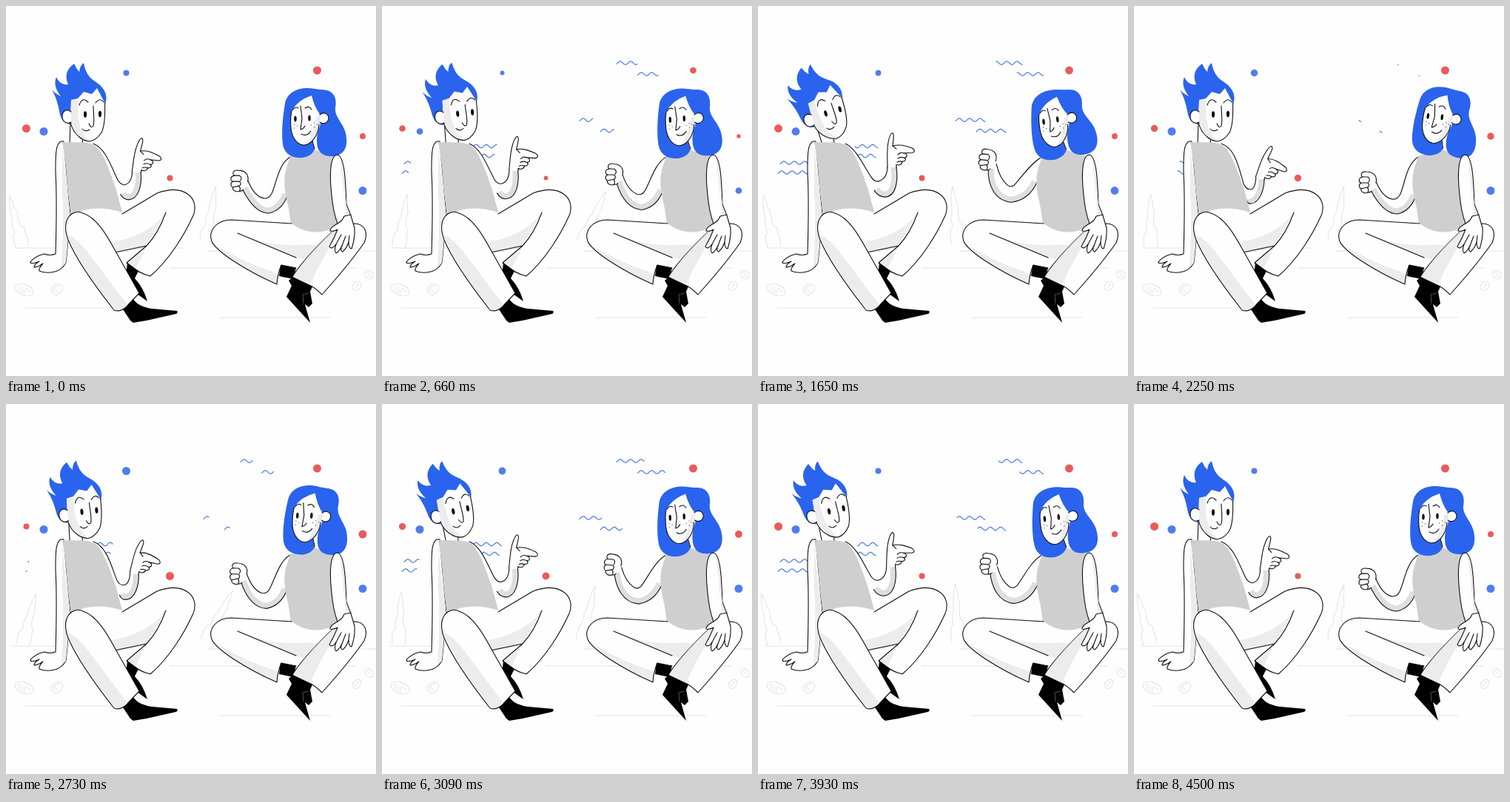
These frames come from a looping animation (500x500 px, 4530 ms). An HTML page:

```html
<!DOCTYPE html>
<html>
<head>
<meta charset="utf-8">
<style>
html, body { margin: 0; width: 100%; height: 100%; overflow: hidden; background: #fefefe; }
svg { display: block; width: 100vw; height: 100vh; }
.ink { stroke: #111; stroke-width: 1.1; stroke-linecap: round; stroke-linejoin: round; }
.w { fill: #fefefe; }
.n { fill: none; }
.g { fill: #cfcfcf; }
.s { fill: #ececec; }
.shade { fill: none; stroke: #dedede; stroke-width: 15; }
.hair { fill: #2a63ee; }
.pale { fill: none; stroke: #e3e3e3; stroke-width: 1; stroke-linejoin: round; }
.wave { fill: none; stroke: #4a7bea; stroke-width: 1.2; stroke-linecap: round; stroke-linejoin: round; }
</style>
</head>
<body>
<svg viewBox="0 0 500 500">
  <clipPath id="mClip"><path id="mClipPath"/></clipPath>
  <clipPath id="fClip"><path id="fClipPath"/></clipPath>
  <g class="pale">
    <path d="M10 327H238M221 354H474M272 331H500M26 408H165M288 421H438"/>
    <ellipse cx="24.5" cy="383.5" rx="13" ry="7.5" transform="rotate(20 24.5 383.5)"/>
    <path d="M17 378Q17 385 26 390M21 380L25 387L27 381L31 386L33 383"/>
    <ellipse cx="69" cy="383" rx="8.5" ry="6.5" transform="rotate(-45 69 383)"/>
    <path d="M64 388Q64 379 73 377M66 383L70 386"/>
    <ellipse cx="474" cy="378.5" rx="7" ry="5" transform="rotate(-45 474 378.5)"/>
    <ellipse cx="490.5" cy="363" rx="6.5" ry="5" transform="rotate(45 490.5 363)"/>
    <path d="M471 382L477 375M488 360L493 366"/>
    <path id="plantL"/>
    <path id="plantR"/>
  </g>
  <g id="waves"></g>
  <g id="dots"></g>

  <!-- man -->
  <path id="mNeck" class="ink w"/>
  <g id="mHead">
    <path class="hair" d="M134 133C138 122 134 113 126 106C117 99 109 97 105 77Q100 80 99 89Q95 85 92 78C82 85 79 94 84 106C77 107 71 103 68 96C64 105 68 114 74 122Q67 119 62 113C69 126 71 136 73 147Q76 158 86 160L100 150Z"/>
    <path class="w" d="M88 127L97 125L105 116L116 119L123 111L133.500 131C134 145 133 163 129 171Q122 182 112 183Q103 181 99 177Q90 170 87 157Z"/>
    <path class="s" d="M88 127L97 125Q96 150 101 165Q106 178 114 182Q103 183 99 177Q90 170 87 157Z"/>
    <path class="ink n" d="M133.500 131C134 145 133 163 129 171Q122 182 112 183Q103 181 99 177Q90 170 87 157"/>
    <path class="ink w" d="M88 143C82 138 76 142 76 149C76 157 83 160 88 157"/>
    <path class="ink n" d="M99 134Q103 122 111 130M121 131Q127 123 132 130M118 135C118 146 120 154 118 162Q115 166 112 159M103 166Q107 171 113 167"/>
    <ellipse cx="107" cy="146.5" rx="2" ry="4.2"/>
    <ellipse cx="127" cy="146" rx="2" ry="4.2"/>
  </g>
  <path id="mArm" class="w"/>
  <path id="mArmShade" class="shade" clip-path="url(#mClip)"/>
  <path id="mArmLine" class="ink n"/>
  <g id="mHand">
    <path class="ink w" d="M-5 3C-5 -10 -6 -22 -4 -31Q-2 -42 1 -43.500Q4 -43 3 -36L2 -26C12 -29 20 -26 29 -23Q34 -19 29 -17L17 -16.500C23 -15 22 -11 18 -10C21 -8 19 -5 15 -5C15 -1 10 1 7 -1L7 3"/>
    <path class="ink n" d="M2 -26L7 -22M17 -16.500Q11 -18 9 -14M18 -10Q12 -12 9 -9M15 -5Q11 -6 8 -4"/>
  </g>
  <path class="ink w" d="M78 183C66 180 67 205 67 225C69 260 68 300 67 335Q59 338 52 335L45 337Q33 343 33 347Q36 349 45 345Q38 349 38 353Q43 353 50 348Q44 354 45 358Q54 362 66 359Q75 357 81 347L87 283Z"/>
  <path class="s" d="M76 190Q81 240 84 260L87 283L81 347L75 353Q79 290 76 250Z"/>
  <path class="g" d="M76 184L105 184.500Q118 185 124 192C135 205 143 232 148 245L158 282Q120 290 88 284Q83 250 82 230Q80 205 76 184Z"/>
  <path class="w" d="M88 284Q115 266 157 279L215 251C245 240 262 265 252 285C240 310 215 346 195 366L163 347L188 325L147 334Z"/>
  <path class="s" d="M216 280Q190 312 138 320L147 334L186 327L163 347L175 355Q192 318 216 280Z"/>
  <path class="ink n" d="M157 281L204 253C242 239 262 261 253 283C242 308 220 344 195 365Q180 362 163 347L190 324Q206 307 216 279M147 333L190 324"/>
  <path d="M164 347L179 358L174 368Q186 381 191 399L177 389L162 364Z"/>
  <path d="M156 407L172 396Q178 406 197 409L231 412Q233 414 230 416L190 425L172 428L168 425Z"/>
  <path class="ink w" d="M93 279C81 283 77 298 84 316C96 345 124 383 146 411Q154 414 162 407L180 388Q166 363 150 335C139 315 124 286 104 280Q99 277 93 279Z"/>
  <path class="s" d="M83 308Q98 316 110 332L164 404Q156 412 147 410Q108 362 85 316Z"/>

  <!-- woman -->
  <path id="fArm" class="w"/>
  <path id="fArmShade" class="shade" clip-path="url(#fClip)"/>
  <path id="fArmLine" class="ink n"/>
  <g id="fHand">
    <path class="ink w" d="M11 -1C13 -10 8 -16 -2 -16C-10 -17 -10 -10 -7 -9C-13 -8 -13 -2 -9 -1C-13 1 -12 6 -9 7C-10 11 -5 14 0 12Q4 12 5 10"/>
    <path class="ink n" d="M-7 -9L0 -9Q4 -6 1 -2M-9 -1L0 -1Q3 2 0 5M-9 7L-1 5Q2 8 0 12"/>
  </g>
  <path class="g" d="M384 203Q400 197 418 193Q430 196 443 203L440 235L444 270L449 300Q414 315 385 299Q384 280 379 260Q374 238 378 222Z"/>
  <g id="fHead">
    <path class="hair" d="M418 112C398 108 380 115 377 132C374 150 372 170 374 186C376 201 388 206 401 205C411 203 417 198 418 189L424 150L432 114Z"/>
    <path class="w" d="M411 174L417 194L424 197L426 158Z"/>
    <path class="ink n" d="M414 182L417 193"/>
    <path class="hair" d="M413 121C418 112 430 112 437 115C445 119 447 128 445 138C444 152 459 160 460 178C462 196 452 203 440 203C426 203 420 196 420 182C420 170 425 162 425 158L424 146Z"/>
    <path class="w" d="M386 142Q394 127 413 121Q417 137 424 146L423 160C422 177 411 188 402 188C392 187 386 176 385 165Q384 150 386 142Z"/>
    <path class="s" d="M419 150L423.500 149L423 160C422 175 412 187 405 187Q415 175 419 150Z"/>
    <path class="ink n" d="M423 160C422 177 411 188 402 188C392 187 386 176 385 165Q384 150 386 142"/>
    <path class="ink w" d="M424 147C430 142 436 146 436 152C435 159 428 160 424 157"/>
    <path class="ink n" d="M387 141Q391 135 395 138M404 138Q410 134 413 140M398 135L400 152L398 167Q402 166 404 162M399 173Q407 177 412 169"/>
    <ellipse cx="391" cy="152.5" rx="1.7" ry="4"/>
    <ellipse cx="410" cy="151.5" rx="1.7" ry="4"/>
    <path d="M389 160h1M393 162h1M389 165h1M412 161h1M416 158h1M416 164h1M420 160h1" stroke="#222"/>
  </g>
  <path class="w" d="M386 294L305 289C284 289 273 304 278 318C284 332 325 358 366 376L372 350L387 366L442 304L447 298Q414 315 386 294Z"/>
  <path class="s" d="M313 307Q360 328 412 322L422 325L405 342L392 341Z"/>
  <path class="s" d="M279 320C284 332 325 358 366 376L369 362Q320 347 279 320Z"/>
  <path class="ink n" d="M386 294L305 289C284 289 273 304 278 318C284 332 325 358 366 376Q367 362 372 350L392 354M313 307L392 340"/>
  <path d="M371 350L392 354L388 369L369 365Z"/>
  <path d="M388 366L415 377L411 386L414 402L409 407L404 403L411 428L379 393L386 378L382 371Z"/>
  <path d="M409 388L401 390L402 402" fill="none" stroke="#555"/>
  <path class="ink w" d="M387 366Q402 342 442 304L470 294C485 294 490 306 484 320Q463 350 427 390Q418 381 410 377Z"/>
  <path class="s" d="M388 366Q402 342 442 304L447 312Q424 345 411 377Z"/>
  <path class="ink w" d="M447 201C436 204 438 238 440 255Q442 278 448 294Q437 300 438 304Q444 305 448 302Q444 313 437 325Q440 330 446 322Q443 330 446 334Q451 331 454 324Q451 331 455 332Q460 328 463 319Q463 328 467 328Q472 313 471 300L466 283L460 268C459 248 459 201 447 201Z"/>
  <path class="s" d="M451 205Q457 218 458 245L460 270L464 280L459 282Q456 245 451 205Z"/>
  <path class="ink n" d="M448 294Q455 290 457 284L466 282M446 322L453 309M454 324L459 311M463 319L464 310"/>
</svg>
<script>
const FRAME = 30, COUNT = 151, BEAT = 30;
const $ = id => document.getElementById(id);
const set = (id, name, value) => $(id).setAttribute(name, value);
const mix = (a, b, u) => a + (b - a) * u;

// eased 0..1 between frames a and b
function ramp(f, a, b) {
  const u = Math.min(1, Math.max(0, (f - a) / (b - a)));
  return u * u * (3 - 2 * u);
}

// up and down on every beat, leaving and returning to rest
function swing(f, rest) {
  if (f < BEAT) return mix(rest, 1, ramp(f, 0, BEAT));
  if (f > 4 * BEAT) return rest * ramp(f, 4 * BEAT, 5 * BEAT);
  const u = f % BEAT / BEAT, e = ramp(u, 0, 1);
  return Math.floor(f / BEAT) % 2 ? 1 - e : e;
}

// slow rise, quick drop, rise again, back to rest
function gesture(f, rest) {
  if (f < 60) return mix(rest, 1, ramp(f, 0, 60));
  if (f < 75) return 1 - ramp(f, 60, 75);
  if (f < 120) return ramp(f, 75, 120);
  return mix(1, rest, ramp(f, 120, 150));
}

// blend two path strings of the same structure
function morph([a, b], p) {
  const nums = b.match(/-?[\d.]+/g);
  let i = 0;
  return a.replace(/-?[\d.]+/g, n => mix(+n, +nums[i++], p).toFixed(2));
}

function add(parent, tag, attrs) {
  const el = document.createElementNS('http://www.w3.org/2000/svg', tag);
  for (const n in attrs) el.setAttribute(n, attrs[n]);
  return $(parent).appendChild(el);
}

const PLANT = 'M-8 0Q-10 -9 -8 -19L-5 -21Q-7 -35 -4 -38Q-4 -55 -2 -65L0 -72Q3 -62 3 -53L5 -50Q3 -36 5 -28L9 -25Q8 -14 10 -10L9 0';
set('plantL', 'd', PLANT);
set('plantR', 'd', PLANT);

// each dot: place, radius at rest, change in the first and second swing
const RED = '#e95b5b', BLUE = '#517dec';
const dots = [
  [162.5, 90.5, BLUE, 4, -1.3, 1.5], [221.5, 232.5, RED, 4, -1.3, 1.5], [482, 176, RED, 4, -1.6, 1.5],
  [27.5, 165.5, RED, 5.5, -1.5, -1.5],
  [51, 169.5, BLUE, 5.5, -1.4, 0], [420.5, 87, RED, 5.5, -1.4, 0], [482, 249.5, BLUE, 5.5, -1.4, 0]
].map(([cx, cy, fill, rest, first, second]) =>
  ({ el: add('dots', 'circle', { cx, cy, fill }), rest, first, second }));

// pairs of waves: place of the first, shift to the second, delay in frames
const LENGTH = 40, PERIOD = 14;
const waves = [[317, 77, 28.5, 15, 3], [267, 154, 28, 14.5, 8], [30, 212, -3, 13, 13], [122, 189.5, -3, 13, 0]]
  .flatMap(([x, y, dx, dy, wait]) => [{ x, y, wait }, { x: x + dx, y: y + dy, wait }]);
for (const w of waves) w.el = add('waves', 'path', { class: 'wave' });

function wavePath({ x, y, wait }, f) {
  const again = f >= 75 + wait / 2;
  const head = again ? ramp(f, 75 + wait, 105 + wait) : ramp(f, wait, 30 + wait);
  const tail = again ? ramp(f, 120 + wait, 150) : ramp(f, 46 + wait, 75 + wait / 2);
  if (head - tail < 0.005) return '';
  const points = [];
  for (let i = 0; i <= LENGTH; i++) {
    const u = LENGTH * mix(tail, head, i / LENGTH);
    const v = -2.2 * Math.cos((u - 5) / PERIOD * 2 * Math.PI);
    points.push((x + u).toFixed(2) + ' ' + (y + v).toFixed(2));
  }
  return 'M' + points.join('L');
}

// limbs and neck at both ends of the gesture
const M_ARM = [
  'M118 186C136 192 141 215 148 240Q151 248 158 248Q164 247 165 230L176 234C176 248 170 266 158 267Q154 268 152 262',
  'M118 186C133 193 142 215 153 231Q157 237 162 237Q175 234 175 217L187 217C190 238 186 258 171 258Q162 257 157 249'];
const M_NECK = ['M87 158L86 187L103 187L104 178', 'M79 163L87 187L103 187L102 176'];
const F_ARM = [
  'M384 204C368 214 366 240 360 254Q356 262 349 261Q336 259 327 237L320 249C330 268 342 281 356 281Q374 277 381 256',
  'M382 205C370 212 358 228 346 242Q342 245 337 242Q326 232 322 213L311 219C310 240 318 262 342 265Q366 262 377 238'];

function arm(who, shape, p) {
  const d = morph(shape, p);
  set(who + 'Arm', 'd', d);
  set(who + 'ClipPath', 'd', d);
  set(who + 'ArmLine', 'd', d.replace('L', 'M'));
  set(who + 'ArmShade', 'd', 'M' + d.split('L')[1]);
}

function draw(f) {
  const lean = gesture(f, 0), nod = gesture(f, 0.53);
  const point = gesture(f, 0.57), fist = gesture(f, 0.06);

  set('mHead', 'transform', `rotate(${-16 * lean} 95 202)`);
  set('mNeck', 'd', morph(M_NECK, lean));
  arm('m', M_ARM, point);
  set('mHand', 'transform', `translate(${mix(170, 180, point)} ${mix(230, 215, point)}) rotate(${20 - 20 * point})`);

  set('fHead', 'transform', `rotate(${-15 * (nod - 0.53)} 422 196)`);
  arm('f', F_ARM, fist);
  set('fHand', 'transform', `translate(${mix(316, 310, fist)} ${mix(240, 209, fist)}) rotate(${6 * fist})`);

  set('plantL', 'transform', `translate(22 326) rotate(${mix(-14, 15, swing(f, 0))})`);
  set('plantR', 'transform', `translate(270 321) rotate(${mix(-8, 28, swing(f, 0.5))}) scale(1 1.08)`);

  for (const d of dots)
    d.el.setAttribute('r', d.rest + swing(f, 0) * (f < 2 * BEAT ? d.first : d.second));
  for (const w of waves) w.el.setAttribute('d', wavePath(w, f));
}

const start = performance.now();
function tick() {
  draw(Math.floor((performance.now() - start) / FRAME) % COUNT);
  requestAnimationFrame(tick);
}
tick();
</script>
</body>
</html>
```
